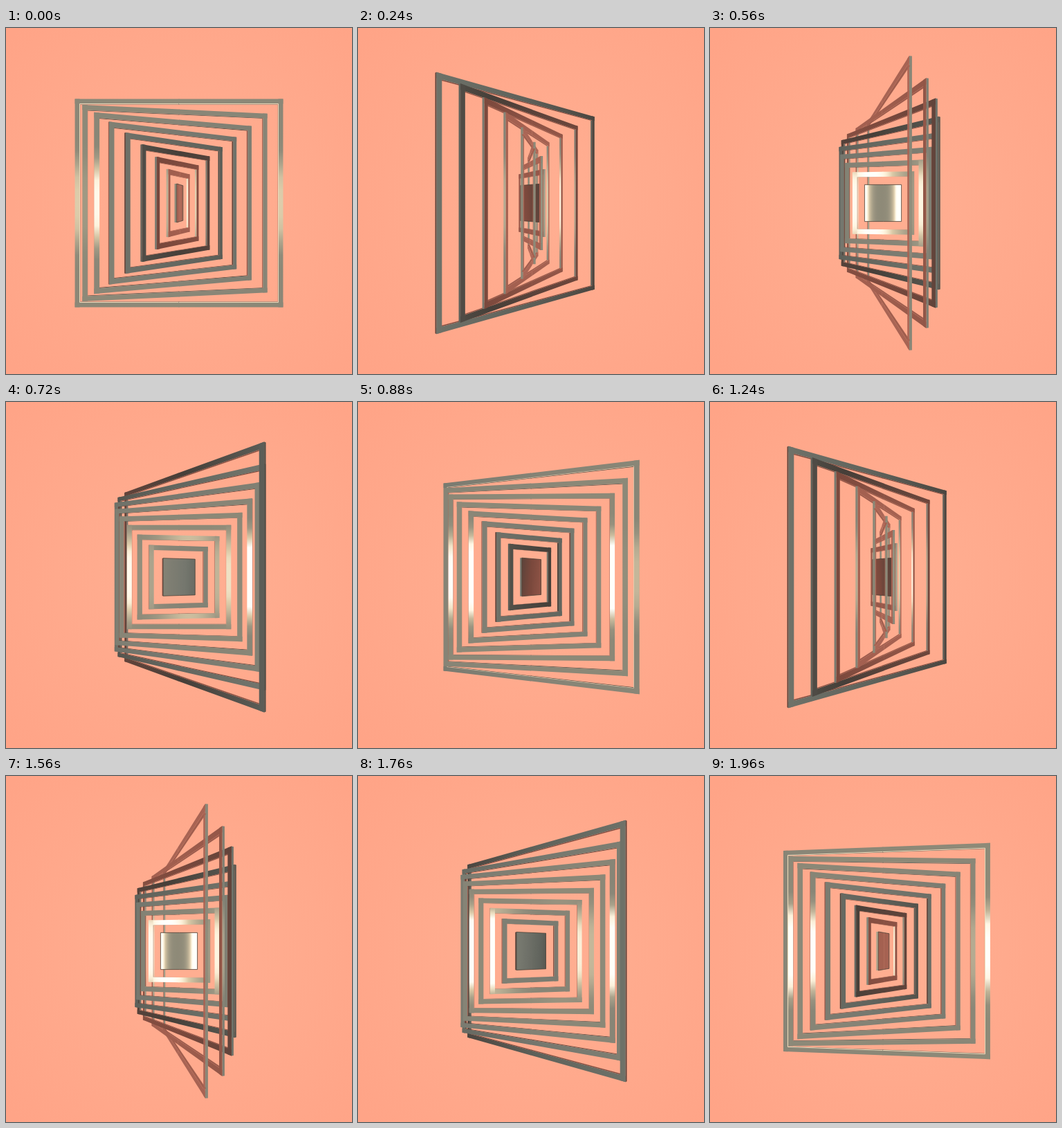
Recreate the animation shown at these times as an HTML page with a canvas. Size 500 by 500 pixels, loop 2000 ms.

```html
<!DOCTYPE html>
<html lang="en">
<head>
<meta charset="utf-8">
<title>Turning frames</title>
<style>
  html, body { margin: 0; width: 100%; height: 100%; overflow: hidden; background: #ffa78b; }
  canvas { display: block; width: 500px; height: 500px; }
</style>
</head>
<body>
<canvas id="stage" width="500" height="500"></canvas>
<script>
const ctx = document.getElementById('stage').getContext('2d');
const CX = 250, CY = 253, EYE = 500;
const RINGS = 9, BAR = 7, DEPTH = 3, STEP = 40, LOOP = 2000;
const LAMP = { x: 240, z: 600, spread: 95 }; // a lamp on either side of the viewer
const RAD = Math.PI / 180;

// Metal tone by reflection angle in degrees
const RAMP = [
  [0, [142, 138, 120]], [40, [134, 132, 118]], [65, [117, 119, 110]],
  [85, [95, 98, 91]], [100, [70, 63, 57]], [118, [122, 72, 60]],
  [140, [162, 95, 79]], [180, [176, 106, 90]]
];
const GLOW = [255, 232, 190], WHITE = [255, 255, 250];

const clamp = v => Math.max(0, Math.min(1, v));
const bell = (v, centre, spread) => Math.exp(-(((v - centre) / spread) ** 2));
const mix = (a, b, k) => a.map((v, i) => v + (b[i] - v) * k);
const css = c => `rgb(${c.map(Math.round).join(',')})`;

function tone(angle) {
  let i = 1;
  while (i < RAMP.length - 1 && angle > RAMP[i][0]) i++;
  const [a0, c0] = RAMP[i - 1], [a1, c1] = RAMP[i];
  return mix(c0, c1, clamp((angle - a0) / (a1 - a0)));
}

// How much light each kind of surface returns for a reflection angle
const shine = {
  face: (a, x) => Math.abs(a) > 80 ? 0
    : 1.4 * bell(Math.abs(x + LAMP.z * Math.tan(a * RAD)), LAMP.x, LAMP.spread),
  outer: a => 0.35 * bell(Math.abs(a), 42, 12),
  inner: a => 0.8 * bell(Math.abs(a), 45, 22)
};
shine.plate = shine.face;

// Colour of a surface whose normal has the given azimuth, at a screen offset
function shade(azimuth, x, y, kind) {
  const bulge = kind === 'plate' ? 6 : 1;
  const view = Math.atan2(-x, EYE) / RAD * bulge;
  let a = (2 * azimuth - view) % 360;
  if (a > 180) a -= 360;
  const level = shine[kind](a, x) * Math.exp(-((y / 58) ** 4));
  const lit = mix(tone(Math.abs(a)), GLOW, clamp(level * 1.25));
  return css(mix(lit, WHITE, clamp((level - 0.55) * 2.5)));
}

function trace(points) {
  ctx.beginPath();
  for (const [x, y] of points) ctx.lineTo(CX + x, CY + y);
}

function quad(points, fill) {
  trace(points);
  ctx.fillStyle = fill;
  ctx.fill();
}

function line(points, color, width) {
  trace(points);
  ctx.strokeStyle = color;
  ctx.lineWidth = width;
  ctx.stroke();
}

// Gradient between two screen offsets, coloured by the shading rule
function sheen(p, q, azimuth, kind) {
  const g = ctx.createLinearGradient(CX + p[0], CY + p[1], CX + q[0] + 0.01, CY + q[1]);
  const n = 16;
  for (let i = 0; i <= n; i++) {
    const k = i / n;
    g.addColorStop(k, shade(azimuth, p[0] + (q[0] - p[0]) * k, p[1] + (q[1] - p[1]) * k, kind));
  }
  return g;
}

// One half of a ring, from the axis outwards on the given side
function drawHalf({ size, angle, dir, solid, rimmed }) {
  const c = Math.cos(angle * RAD), s = Math.sin(angle * RAD);
  const project = (u, y, w) => {
    const k = EYE / (EYE + u * s - w * c);
    return [(u * c + w * s) * k, y * k];
  };
  const half = DEPTH / 2, front = c >= 0 ? half : -half;
  const inner = size - BAR, overlap = -0.5 * dir;

  const sideWall = (h, kind) => {
    const u = dir * h;
    const wall = [project(u, -h, half), project(u, -h, -half), project(u, h, -half), project(u, h, half)];
    quad(wall, sheen(wall[0], wall[3], angle + 90, kind));
  };
  const face = (u0, u1, y0, y1, upright, kind) => {
    const shape = [project(u0, y0, front), project(u1, y0, front), project(u1, y1, front), project(u0, y1, front)];
    quad(shape, sheen(shape[0], upright ? shape[3] : shape[1], angle, kind));
  };
  const outline = h => [[0, -h], [dir * h, -h], [dir * h, h], [0, h]].map(([u, y]) => project(u, y, front));

  if (-dir * s * EYE > size) sideWall(size, 'outer');

  if (solid) {
    face(overlap, dir * size, -size, size, false, 'plate');
    line(outline(size), '#4a4238', 0.8);
    return;
  }

  if (dir * s * EYE + inner > 0) sideWall(inner, 'inner');
  const lip = css(tone(80 + 60 * Math.abs(s)));
  for (const v of [-1, 1]) {
    const y = v * inner;
    quad([project(overlap, y, half), project(dir * inner, y, half),
          project(dir * inner, y, -half), project(overlap, y, -half)], lip);
    face(overlap, dir * size, v * size, y, false, 'face');
  }
  face(dir * size, dir * inner, -size, size, true, 'face');
  if (rimmed) line(outline(inner), `rgba(240,222,190,${clamp((Math.abs(c) - 0.88) * 12)})`, 1);
}

function draw(time) {
  const bg = ctx.createRadialGradient(265, 250, 40, 265, 250, 350);
  bg.addColorStop(0, '#ffae91');
  bg.addColorStop(1, '#ffa487');
  ctx.fillStyle = bg;
  ctx.fillRect(0, 0, 500, 500);

  const halves = [];
  for (let i = 0; i < RINGS; i++) {
    const solid = i === RINGS - 1;
    const angle = time * 0.18 + i * 10;
    for (const dir of [-1, 1]) {
      halves.push({ size: solid ? 26.5 : 150 - 15 * i, angle, dir, solid, rimmed: i === 0,
                    near: -dir * Math.sin(angle * RAD) });
    }
  }
  // All halves share the axis, so sorting by direction gives the exact overlap
  halves.sort((a, b) => a.near - b.near).forEach(drawHalf);
}

const start = performance.now();
function tick() {
  const t = (performance.now() - start) % LOOP;
  draw(Math.floor(t / STEP) * STEP);
  requestAnimationFrame(tick);
}
tick();
</script>
</body>
</html>
```
